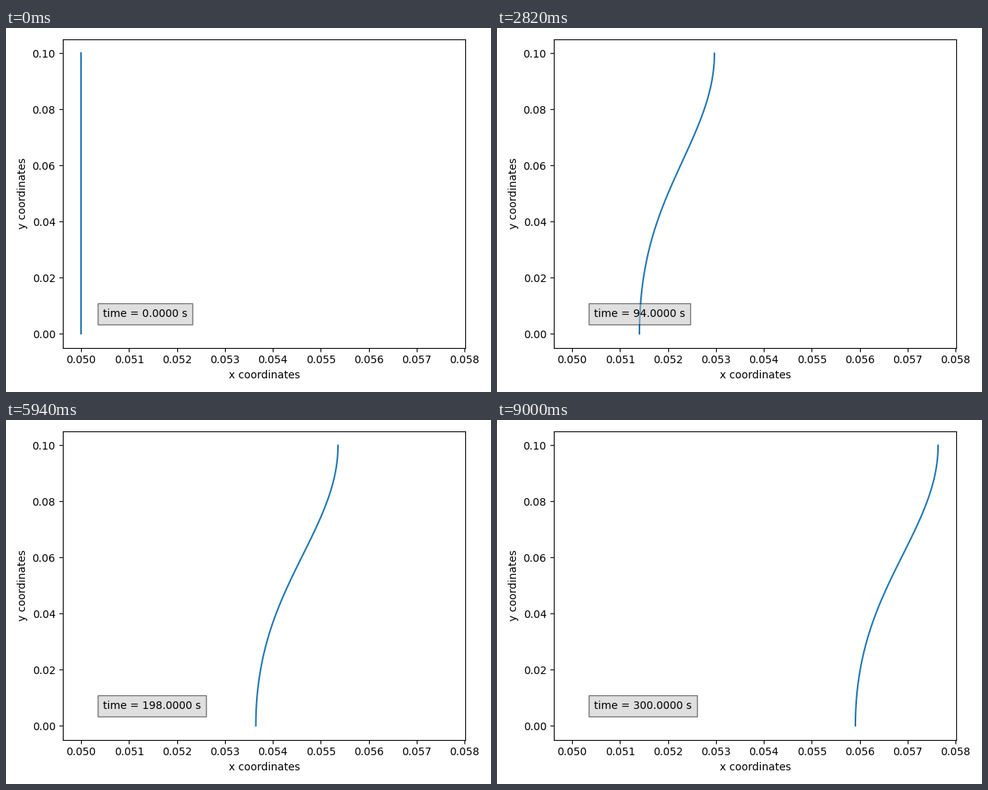
Write a matplotlib script that moves like this. It is 640x480 px and loops after 9.06 s.

```python
import numpy as np
import matplotlib.pyplot as plt
from matplotlib.animation import FuncAnimation

FRAMES = 151
INTERVAL = 60          # ms
STEP = 2.0             # simulated seconds per frame
X0, HEIGHT = 0.05, 0.1
SPEED = 2.2262e-5      # mean drift of the profile per second
DECAY = 0.0252         # relaxation rate of the first mode
MODES = {1: -8.632e-4, 2: 9.33e-5}

plt.rcParams["font.family"] = "DejaVu Sans"

y = np.linspace(0, HEIGHT, 101)


def profile(t):
    """Drifting front whose cosine modes relax to a steady shape."""
    x = X0 + SPEED * t + 0 * y
    for n, amp in MODES.items():
        grown = 1 - np.exp(-DECAY * n**2 * t)
        x += amp * grown * np.cos(n * np.pi * y / HEIGHT)
    return x


fig, ax = plt.subplots(figsize=(6.4, 4.8), dpi=100)
line, = ax.plot(profile(0), y, color="#1f77b4", lw=1.5)

x_max = profile(STEP * (FRAMES - 1)).max()
margin = 0.05 * (x_max - X0)
ax.set_xlim(X0 - margin, x_max + margin)
ax.set_ylim(-0.05 * HEIGHT, 1.05 * HEIGHT)
ax.set_xlabel("x coordinates")
ax.set_ylabel("y coordinates")

label = ax.text(0.1, 0.1, "", transform=ax.transAxes,
                bbox=dict(facecolor="silver", alpha=0.5, pad=5))
fig.tight_layout()


def update(i):
    t = STEP * i
    line.set_xdata(profile(t))
    label.set_text(f"time = {t:.4f} s")
    return line, label


anim = FuncAnimation(fig, update, frames=FRAMES, init_func=lambda: update(0),
                     interval=INTERVAL, repeat=True, repeat_delay=0)
plt.show()
```
